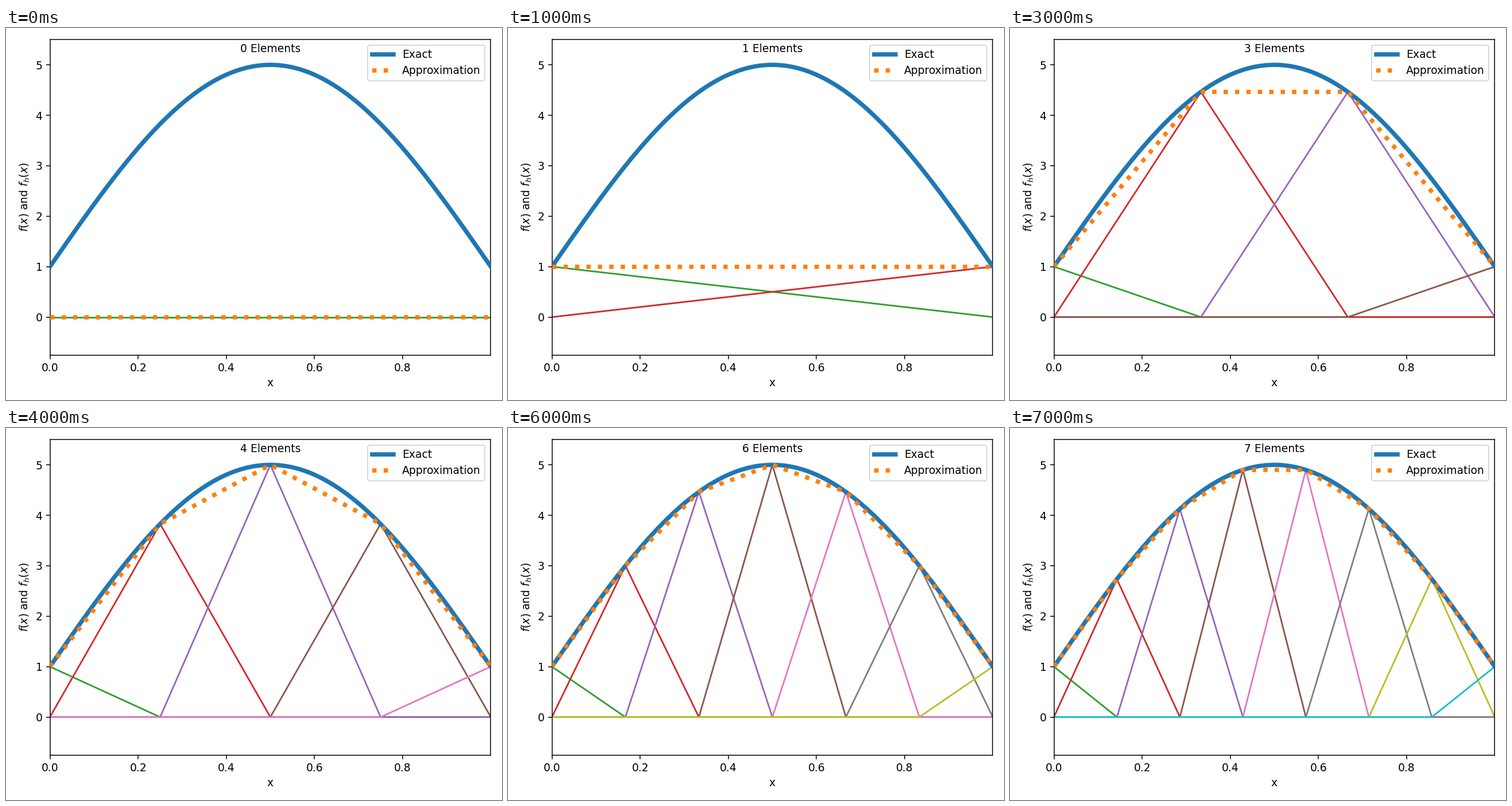
Write a matplotlib script that moves like this. It is 864 by 648 pixels and loops after 8 s.

```python
import numpy as np
import matplotlib.pyplot as plt
from matplotlib.animation import FuncAnimation

W, H, DPI = 864, 648, 135
STEPS = 8

x = np.arange(0, 1, 0.001)


def f(t):
    return 1 + 4 * np.sin(np.pi * t)


fig, ax = plt.subplots(figsize=(W / DPI, H / DPI), dpi=DPI)
fig.subplots_adjust(left=76.5 / W, right=843.75 / W,
                    bottom=1 - 569.5 / H, top=1 - 20.25 / H)

ax.plot(x, f(x), color="C0", lw=4, zorder=3, label="Exact")
approx, = ax.plot(x, 0 * x, ":", color="C1", lw=4, zorder=4,
                  label="Approximation")
hats = [ax.plot([], [], color=f"C{i + 2}", lw=1.5, zorder=2)[0]
        for i in range(STEPS)]
title = ax.text(0.5, 5.25, "", ha="center", zorder=5)

ax.set_xlim(x[0], x[-1])
ax.set_ylim(-0.75, 5.5)
ax.set_xlabel("x")
ax.set_ylabel("$f(x)$ and $f_h(x)$")
ax.legend(loc="upper right")


def weighted_hats(n):
    """Nodal basis functions on n elements, scaled by the nodal values."""
    if n == 0:
        return [np.zeros_like(x)]
    nodes = np.arange(n + 1) / n
    return [f(p) * np.clip(1 - n * np.abs(x - p), 0, None) for p in nodes]


def update(n):
    curves = weighted_hats(n)
    approx.set_data(x, np.sum(curves, axis=0))
    for i, line in enumerate(hats):
        if i < len(curves):
            line.set_data(x, curves[i])
        else:
            line.set_data([], [])
    title.set_text(f"{n} Elements")
    return [approx, title, *hats]


anim = FuncAnimation(fig, update, frames=STEPS, interval=1000, repeat=True,
                     repeat_delay=0, blit=False)
plt.show()
```
